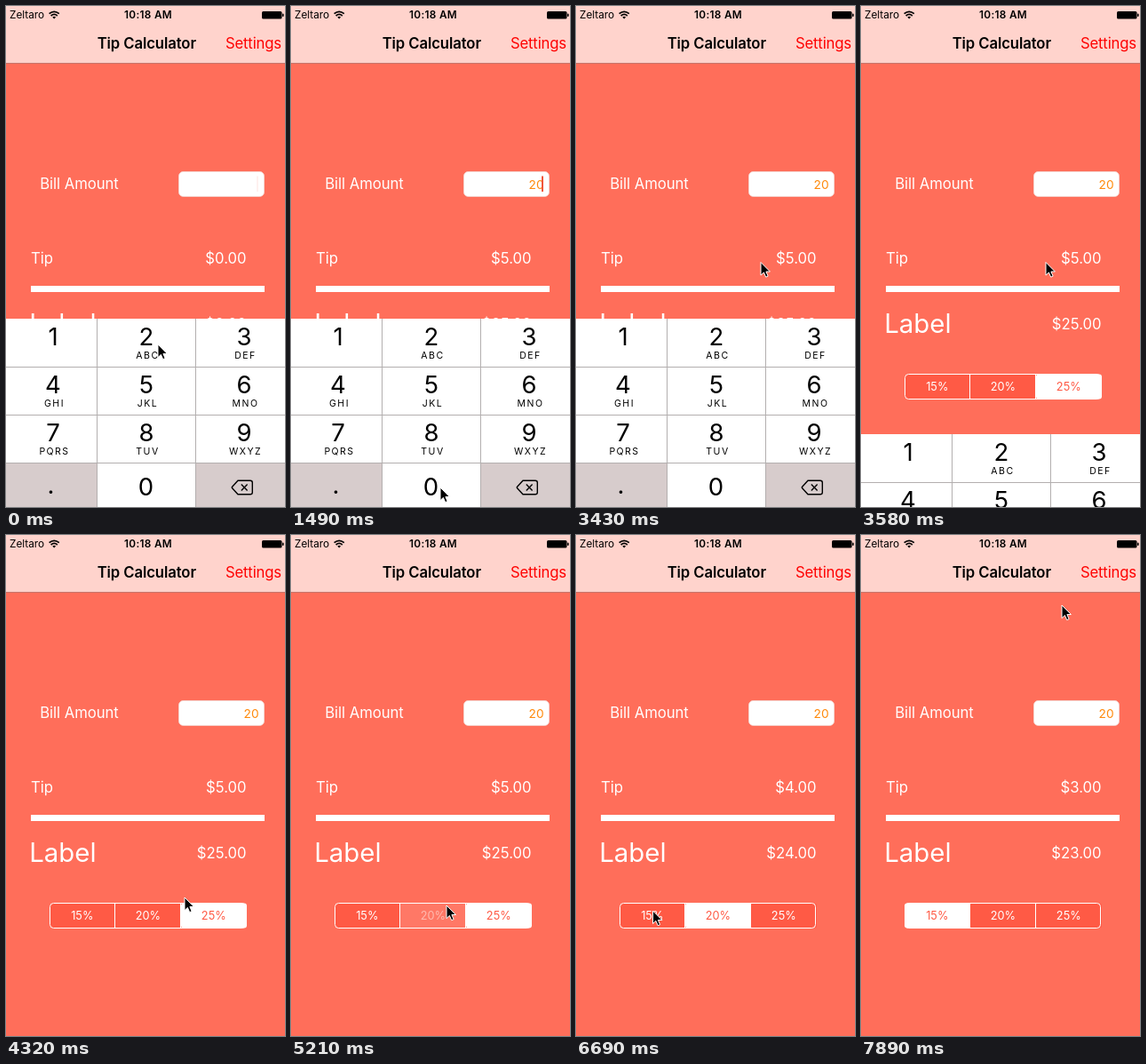
An HTML page for the animation above (8000 ms loop, 314 by 564 pixels).

```html
<!DOCTYPE html>
<html lang="en">
<head>
<meta charset="utf-8">
<title>Tip Calculator</title>
<style>
  html, body { margin: 0; width: 100%; height: 100%; overflow: hidden; background: #ff6e5a; }
  svg { display: block; width: 100%; height: 100%; font: 16.7px Inter, "Liberation Sans", sans-serif; }
  .white { fill: #fff; }
  .mid { text-anchor: middle; }
  .end { text-anchor: end; }
  .status { font-size: 11.8px; }
  .bold { font-weight: 600; }
  .digit { font-size: 27.5px; }
  .letters { font-size: 10.5px; letter-spacing: 1.5px; }
  .option { font-size: 12.75px; }
</style>
</head>
<body>
<svg viewBox="0 0 314 564">
  <rect width="314" height="564" fill="#ff6e5a"/>
  <rect width="314" height="64" fill="#ffd3cc"/>
  <rect y="64" width="314" height="1" fill="#c6766b"/>

  <text class="status" x="4" y="14.3">Zeltaro</text>
  <g fill="none" stroke="#000" stroke-width="1.7">
    <path d="M48.6 8.7Q54.2 3.9 59.8 8.7M50.6 11Q54.2 7.9 57.8 11"/>
    <path d="M54.2 14.6L52.3 12.5Q54.2 11.2 56.1 12.5Z" fill="#000" stroke="none"/>
  </g>
  <text class="status bold mid" x="160" y="14.3" letter-spacing=".3">10:18 AM</text>
  <rect x="288" y="6" width="22.5" height="8.6" rx="1.5"/>
  <rect x="311" y="8.6" width="1.6" height="3.4" rx=".8"/>

  <text class="bold mid" x="158.3" y="48" letter-spacing="-.1">Tip Calculator</text>
  <text class="end" x="310" y="48" fill="#f00" letter-spacing="-.15">Settings</text>

  <text class="white" x="38.2" y="206.4" letter-spacing="-.05">Bill Amount</text>
  <rect class="white" x="194.5" y="186.5" width="96" height="28" rx="5" stroke="#f3d6d1" stroke-width=".8"/>
  <text class="end" id="bill" x="284.6" y="206" font-size="13.7" fill="#ff8a0c"></text>
  <rect id="caret" x="282" y="191.5" width="2" height="17.5" fill="#f0553a"/>

  <text class="white" x="28" y="290">Tip</text>
  <text class="white end" id="tip" x="270.6" y="290"></text>
  <rect class="white" x="28" y="315" width="263" height="7"/>
  <text class="white" x="26.2" y="368" font-size="29.4">Label</text>
  <text class="white end" id="total" x="270.6" y="363.7"></text>

  <g id="options"></g>
  <rect x="49.5" y="414.5" width="220" height="28" rx="4" fill="none" stroke="#fff"/>
  <path d="M122.5 415v27M196.5 415v27" stroke="#fff"/>

  <g id="keyboard">
    <rect class="white" y="352" width="314" height="212"/>
    <path d="M0 514h102v50H0zM213 514h101v50H213z" fill="#d7cccc"/>
    <path d="M0 406.5H314M0 460.5H314M0 514.5H314M102.5 352V564M213.5 352V564" stroke="#b3afaf"/>
    <g id="keys"></g>
    <g fill="none" stroke="#000" stroke-width="1.4">
      <path d="M261 534.2H275Q277.3 534.2 277.3 536.5V547.5Q277.3 549.8 275 549.8H261L254.6 542.8Q254 542 254.6 541.2Z"/>
      <path d="M264.8 538.6l6.8 6.8m0-6.8l-6.8 6.8"/>
    </g>
  </g>

  <path id="cursor" d="M0 0V14.6L3.4 11.4 5.7 16.7 8.1 15.6 5.9 10.5H10.4Z" stroke="#fff"/>
</svg>
<script>
const LOOP = 8000, TICK = 148.9;
const el = id => document.getElementById(id);
const money = value => '$' + value.toFixed(2);
const label = (cls, x, y, text) => `<text class="${cls}" x="${x}" y="${y}">${text}</text>`;

const columns = [53, 158, 268];
const groups = ['', 'ABC', 'DEF', 'GHI', 'JKL', 'MNO', 'PQRS', 'TUV', 'WXYZ'];
el('keys').innerHTML = groups.map((letters, i) => {
  const x = columns[i % 3], y = 382 + 54 * Math.floor(i / 3);
  return label('digit mid', x, y, i + 1) + label('letters mid', x + 1.5, y + 15, letters);
}).join('') + label('digit mid', 157.5, 551, 0) + label('digit mid', 50.5, 549, '.');

const rates = [15, 20, 25];
el('options').innerHTML = rates.map((rate, i) =>
  `<g><rect x="${49 + 74 * i}" y="414.5" width="74" height="28" rx="3"/>` +
  label('option mid', 85.8 + 74 * i, 433.2, rate + '%') + '</g>').join('');
const options = [...el('options').children];

// Pointer moves, in ticks: start, end, x, y
const start = [171, 381];
const moves = [
  [1, 6, 168, 542], [12, 20, 208, 288.5], [27, 29, 201, 408],
  [30, 32, 175, 417], [38, 43, 86.5, 423], [48, 53, 226, 79]
];

function pointer(n) {
  let [x, y] = start;
  for (const [from, to, toX, toY] of moves) {
    const p = Math.min(1, Math.max(0, (n - from) / (to - from)));
    const eased = p * p * (3 - 2 * p);
    x += (toX - x) * eased;
    y += (toY - y) * eased;
  }
  return [x, y];
}

function caretOpacity(n) {
  if (n < 1) return 0.08;
  const on = n < 6 || (n >= 8 && n < 13) || (n >= 16 && n < 20) || n === 22;
  return on ? 1 : 0;
}

function draw(now) {
  const n = Math.floor((now % LOOP + 5) / TICK);
  const bill = n < 1 ? '' : n < 9 ? '2' : '20';
  const selected = n < 36 ? 2 : n < 46 ? 1 : 0;
  const pressed = n === 35 ? 1 : n === 45 ? 0 : -1;
  const tip = bill * rates[selected] / 100;

  el('bill').textContent = bill;
  el('tip').textContent = money(tip);
  el('total').textContent = money(+bill + tip);
  el('caret').setAttribute('opacity', caretOpacity(n));

  options.forEach((option, i) => {
    const [box, text] = option.children;
    box.setAttribute('fill', i === selected ? '#fff' : i === pressed ? '#ff7866' : '#ff5a45');
    text.setAttribute('fill', i === selected ? '#ff5a45' : i === pressed ? '#ffb9ae' : '#fff');
  });

  const slide = n < 24 ? 0 : n < 25 ? 130 : 214;
  el('keyboard').setAttribute('transform', `translate(0 ${slide})`);
  el('cursor').setAttribute('transform', `translate(${pointer(n)})`);
}

const begin = performance.now();
(function frame() {
  draw(performance.now() - begin);
  requestAnimationFrame(frame);
})();
</script>
</body>
</html>
```
